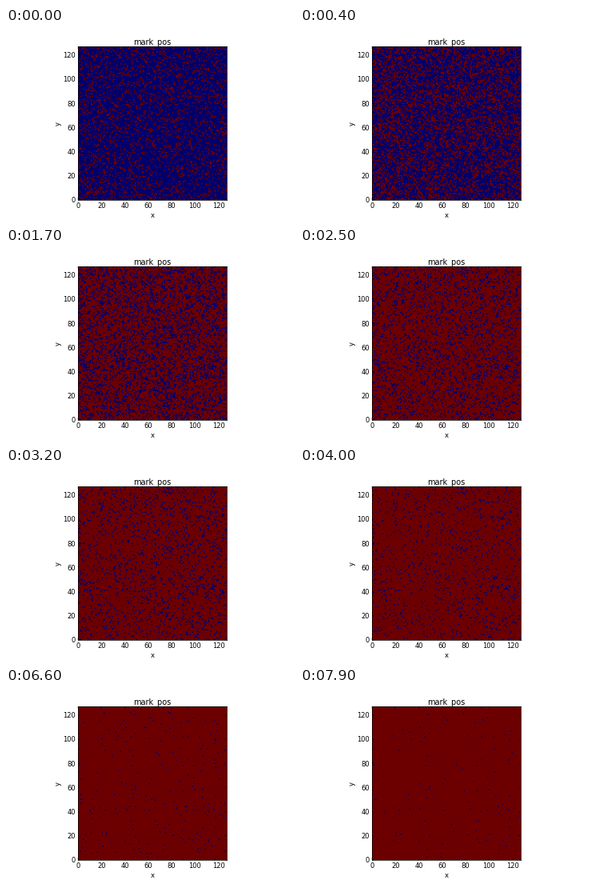
A matplotlib script for the animation above (8000 ms loop, 360 by 240 pixels).

```python
import numpy as np
import matplotlib.pyplot as plt
from matplotlib.animation import FuncAnimation
from matplotlib.colors import LinearSegmentedColormap

W, H, DPI = 360, 240, 50
LEFT, BOTTOM, PLOT_W, PLOT_H = 90, 25, 186, 192
FRAMES, STEP_MS = 80, 100
N = 128
START, RATE = 0.80, 0.06  # unmarked share at first, and its decay per step

plt.rcParams.update({
    "font.family": "DejaVu Sans",
    "font.size": 12,
    "axes.titlesize": 14,
    "axes.linewidth": 1.0,
})


def marking_order():
    """Rank of every cell from 0 to 1, random with slight clustering."""
    rng = np.random.default_rng(11)
    noise = rng.normal(size=(N, N))
    patches = rng.normal(size=(N, N))
    for _ in range(4):
        patches = (patches + sum(np.roll(patches, s, axis)
                                 for s in (-1, 1) for axis in (0, 1))) / 5
    score = noise + 0.2 * patches / patches.std()
    return score.ravel().argsort().argsort().reshape(N, N) / N**2


def coverage(pixels):
    """Share of each pixel that each of the N cells covers."""
    edges = np.arange(pixels + 1) * N / pixels
    lo, hi = edges[:-1, None], edges[1:, None]
    cell = np.arange(N)
    overlap = np.minimum(hi, cell + 1) - np.maximum(lo, cell)
    return np.clip(overlap, 0, None) * pixels / N


order = marking_order()
rows, cols = coverage(PLOT_H), coverage(PLOT_W)


def marks(i):
    unmarked = START * np.exp(-RATE * i)
    return rows @ (order < 1 - unmarked) @ cols.T


fig = plt.figure(figsize=(W / DPI, H / DPI), dpi=DPI, facecolor="white")
ax = fig.add_axes([LEFT / W, BOTTOM / H, PLOT_W / W, PLOT_H / H])
cmap = LinearSegmentedColormap.from_list("marks", ["#00006c", "#6c0000"])
image = ax.imshow(marks(0), cmap=cmap, vmin=0, vmax=1, origin="lower",
                  aspect="auto", extent=(0, 127, 0, 127),
                  interpolation="nearest")

ax.set_title("mark_pos", pad=3.6)
ax.set_xlabel("x", labelpad=5)
ax.set_ylabel("y", labelpad=1.8)
ax.set_xticks(range(0, 121, 20))
ax.set_yticks(range(0, 121, 20))
ax.tick_params(direction="in", length=4, width=0.5, pad=4,
               top=True, right=True)


def update(i):
    image.set_data(marks(i))
    return [image]


anim = FuncAnimation(fig, update, frames=FRAMES, interval=STEP_MS,
                     repeat=True, repeat_delay=0)
plt.show()
```
